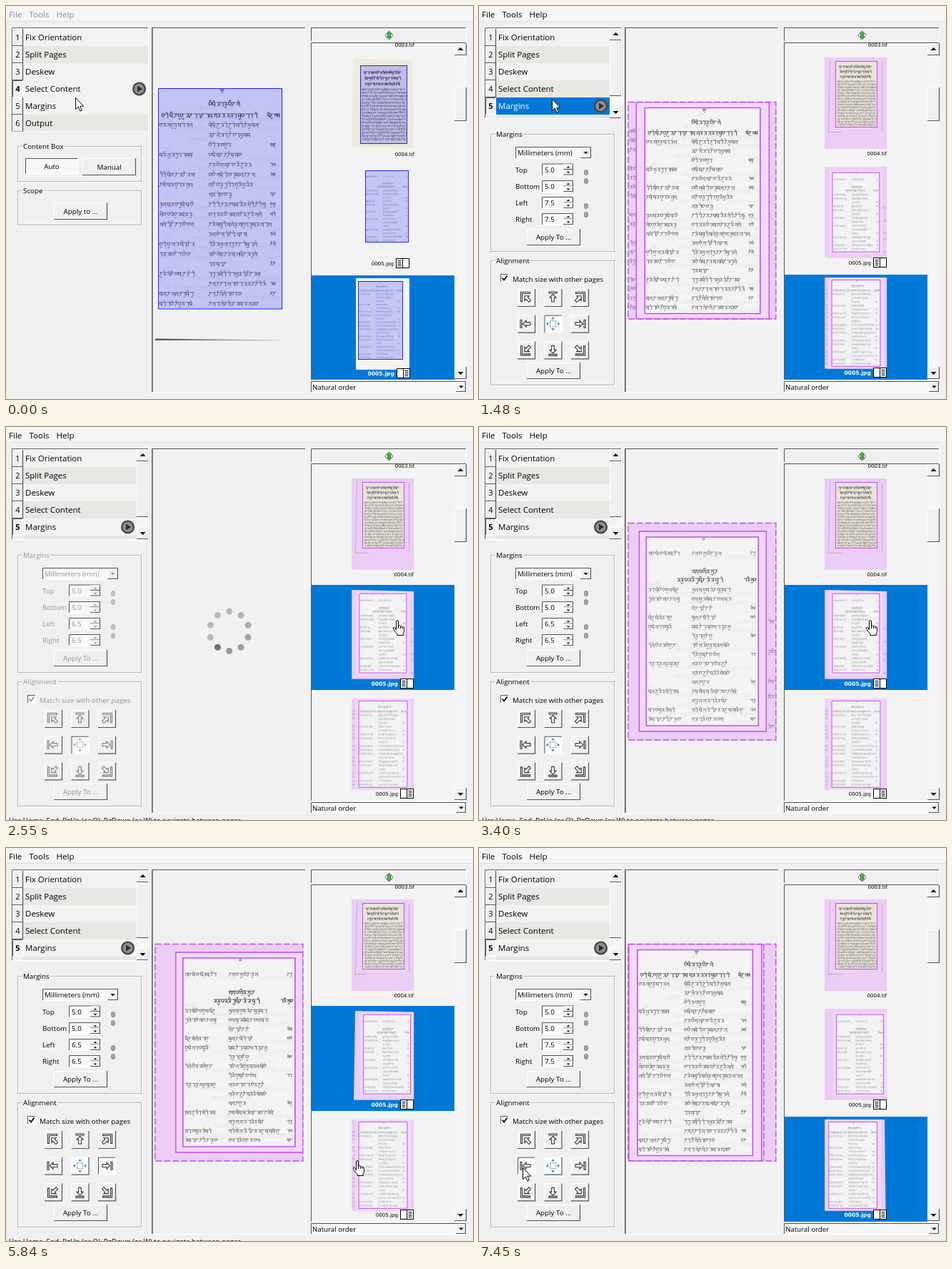
An HTML page that plays this animation: 654 by 550 pixels, repeating every 8000 ms.

```html
<!DOCTYPE html>
<html lang="en">
<head>
<meta charset="utf-8">
<title>Margins walkthrough</title>
<style>
html, body { margin: 0; width: 100%; height: 100%; overflow: hidden; background: #f0f0f0; }
svg { display: block; width: 654px; height: 550px; font-family: "Open Sans", "Noto Sans", sans-serif; }
text { fill: currentColor; white-space: pre; }
.tag { font-family: "DejaVu Sans", sans-serif; }
.off { color: #969696; }
.off .icon { opacity: .6; }
.title { paint-order: stroke; stroke: #f0f0f0; stroke-width: 5; }
.ink { fill: none; stroke: #4a4a4e; }
</style>
</head>
<body>
<svg id="stage" viewBox="0 0 654 550" color="#000"></svg>
<script>
const LOOP = 8000;
const BLUE = '#0078d7';
const $ = id => document.getElementById(id);

// ---------- drawing helpers ----------
const rect = (x, y, w, h, fill, more = '') =>
  `<rect x="${x}" y="${y}" width="${w}" height="${h}" fill="${fill}" ${more}/>`;
const path = (d, stroke, more = '') => `<path d="${d}" fill="none" stroke="${stroke}" ${more}/>`;
const text = (x, y, s, size = 9.8, more = '') =>
  `<text x="${x}" y="${y}" font-size="${size}" ${more}>${s}</text>`;
const group = (id, body, more = '') => `<g id="${id}" ${more}>${body}</g>`;
const at = (x, y, body, k = 1) => `<g transform="translate(${x} ${y}) scale(${k})">${body}</g>`;

function bevel(x, y, w, h, down, fill = '#f0f0f0') {
  const light = down ? '#555' : '#fff', dark = down ? '#fff' : '#555';
  return rect(x, y, w, h, fill) +
    path(`M${x + .5} ${y + h}V${y + .5}H${x + w}`, light) +
    path(`M${x} ${y + h - .5}H${x + w - .5}V${y}`, dark, down ? '' : 'stroke-width="1.2"');
}
const button = (x, y, w, h, s, down) =>
  bevel(x, y, w, h, down, down ? '#f7f7f7' : '#f0f0f0') +
  text(x + w / 2, y + h / 2 + 3.5, s, 9.8, 'text-anchor="middle"');
const frame = (y, h, s) =>
  rect(17.5, y + .5, 173, h, 'none', 'stroke="#fff"') +
  rect(16.5, y - .5, 173, h, 'none', 'stroke="#b4b4b4"') +
  text(24, y + 3, s, 9.8, 'class="title"');
const tri = (x, y, r, up) =>
  `<path d="M${x - r} ${y}h${2 * r}l${-r} ${up ? -r : r}z" fill="currentColor"/>`;

// ---------- script-like handwriting ----------
let seed = 7;
const rnd = () => (seed = (seed * 16807) % 2147483647) / 2147483647;
const LETTERS = ['h4m-.4 0v5.4', 'h4m-3.6 0q-1 4 1.6 3.6q2.2-.6 1.8-3.6', 'h4m-2 0v2.6q-2.2.8-2 2.6',
  'm0 .6q1.6-1 2 .8q0 2-2 2.2m2-3.4h2v5.2', 'h3.6q-.5 3-3 4.4m3-2.4v2.6', 'h4m-3.6 0v3h3m0-3v5.4'];
const MARKS = ['m.5-1.4q1.5-2.2 3 0', 'm1-2.6l2.2 1.4', 'm.8 6.2q1.6 2 2.8-.4'];

// A run of syllables of width w whose head line is at y.
function run(x, y, w, k = 1) {
  const d = [], n = v => v.toFixed(1);
  for (let p = x, left = 2; p < x + w - 3 * k; p += 4.6 * k) {
    const shape = s => s.replace(/-?\d*\.?\d+/g, v => n(v * k) + ' ');
    d.push(`M${n(p)} ${n(y)}` + shape(LETTERS[rnd() * 6 | 0]));
    if (rnd() < .45) d.push(`M${n(p)} ${n(y)}` + shape(MARKS[rnd() * 3 | 0]));
    if (--left <= 0) {
      p += 1.6 * k;
      d.push(`M${n(p + 3 * k)} ${n(y)}h${n(.9 * k)}`);
      left = 1 + (rnd() * 3 | 0);
    }
  }
  return d.join('');
}

// Rows: "left mid", a trailing n adds the page number.
function rows(spec, y, step, cols, k) {
  return spec.split('|').map((row, i) => {
    const [l, m] = row.split(' ').map(parseFloat), top = y + i * step;
    return (l ? run(cols[0], top, l, k) : '') + run(cols[1], top, m, k) +
      (row.endsWith('n') ? run(cols[2], top, 9, .8 * k) : '');
  }).join('');
}
const strong = (d, w) => `<path d="${d}" stroke-width="${w}"/>`;

const page7 = strong(run(86, 2, 8, .7) + rows('47 71|0 57|0 31n|50 46|0 61n|51 67n|47 66|0 32n|50 79n|47 78n|49 88|0 56n|51 71n|47 71|0 28n|49 71|0 82n|48 48n|48 71',
  49.5, 13.9, [2, 71, 157], 1), .75) +
  strong(run(71, 20, 43, 1.05) + run(5, 36, 136, 1.05) + run(153, 36, 20, .9), 1.05);
const page6 = strong(run(79, 2, 5, .7) + rows('43 42n', 21, 0, [3, 64, 146], .92) +
  rows('44 57|43 57|0 29n|35 34n|34 53|0 28n|41 54|0 40n|43 52|0 52|0 26n|44 66|0 52n|40 70n|46 47n',
    72, 12.93, [3, 64, 146], .92), .7) +
  strong(run(64, 46, 38, 1) + run(43, 58, 66, 1) + run(137, 58, 20, .85), 1.05);
const leafRows = () => {
  let d = '';
  for (let i = 0; i < 16; i++) d += run(4, 62 + i * 9.3, 126, 1);
  return strong(d, .9) + strong(run(8, 14, 112, 1.3) + run(12, 30, 105, 1.3) + run(14, 46, 100, 1.3), 1.9);
};
const bleed = (x, w, y, step, n) => {
  let d = '';
  for (let i = 0; i < n; i++) if (rnd() < .6) d += run(x, y + i * step, w, .9);
  return strong(d, .7);
};

// ---------- page scenes in a 207 x 304 area ----------
const PAGES = {
  7: { x: 23.5, y: 8, w: 161.5, h: 288, hx: 11.5, hy: 0, hw: 186, hh: 303.5, k: .926 },
  6: { x: 25.5, y: 19.5, w: 157, h: 264, hx: 15.5, hy: 11.5, hw: 178, hh: 280, k: 1 }
};
const line = 'stroke="#be50f0" vector-effect="non-scaling-stroke"';
function scene(n, dx, small) {
  const p = PAGES[n];
  const paper = rect(p.hx, p.hy, p.hw, p.hh, '#f1d7fb') + rect(p.x, p.y, p.w, p.h, '#f3f2f4') +
    `<g class="ink words" opacity="${small ? .65 : 1}"><use href="#page${n}" transform="translate(${p.x} ${p.y}) scale(${p.k})"/>` +
    `<use href="#page${n}" transform="translate(${p.x + p.w} ${p.y + 6}) scale(${-p.k} ${p.k})" opacity=".07"/>` +
    `<use href="#bleed${n}" opacity=".7"/></g>` +
    (small ? '' : rect(p.hx, p.hy, p.hw, p.hh, 'none', line + ' stroke-width="1.4"')) +
    rect(p.x, p.y, p.w, p.h, 'none', line + ` stroke-width="${small ? 1 : 1.6}"`);
  const dash = line + ' stroke-width="1.4" stroke-dasharray="9 3"';
  return rect(0, 0, 207, 304, '#ebcdf5') +
    `<g clip-path="url(#area)"><g transform="translate(${dx} 0)">${paper}</g></g>` +
    (small ? '' : rect(0, 0, 207, 303.5, 'none', dash) +
      (dx < 0 ? path('M190 0V303', '#be50f0', dash) : ''));
}

// ---------- static chrome ----------
const scroller = (x, y0, y1, t0, t1) =>
  rect(x, y0, 17, y1 - y0, '#f5f5f5') + bevel(x, y0, 17, 17) + tri(x + 8.5, y0 + 10, 4, true) +
  bevel(x, y1 - 17, 17, 17) + tri(x + 8.5, y1 - 10, 4) + bevel(x, t0, 17, t1 - t0);

const NAMES = ['Fix Orientation', 'Split Pages', 'Deskew', 'Select Content', 'Margins', 'Output'];
function list(count, active, width) {
  let s = '';
  for (let i = 0; i < count; i++) {
    const y = 32 + i * 24, on = i === active;
    s += rect(24, y, width - 24, 24, i % 2 && !on ? '#e8e7e4' : '#f2f2f2');
    if (on && count < 6) s += group('hot', rect(24, y, width - 24, 24, BLUE));
    s += bevel(9, y, 15, 24, on) + text(16.5, y + 16, i + 1, 11, `text-anchor="middle" ${on ? 'font-weight="700"' : ''}`) +
      text(27, y + 16, NAMES[i], 11.5, on ? 'id="name' + count + '"' : '');
    if (on) s += at(width - 12.5, y + 12, '<circle r="9.5" fill="#444"/><circle r="7.2" fill="#8f8f8f"/><path d="M-2.5-4.5L4.5 0L-2.500 4.500z" fill="#2c2c2c"/>');
  }
  return s;
}

const spinBox = (s, y, id) => text(51, y + 4, s) + bevel(88, y - 8, 45, 17, true, '#f8f8f8') +
  text(92, y + 4, '5.0', 9.8, id ? 'class="side"' : '') + bevel(118, y - 7, 14, 7.5) + bevel(118, y + .5, 14, 7.5) +
  tri(125, y - 2, 2.2, true) + tri(125, y + 3.5, 2.2);
const chain = y => at(150, y, '<g class="icon" fill="none" stroke="#444"><rect x="-2" y="-3.5" width="4" height="6" rx="1"/><path d="M0-2v3"/><rect x="-2" y="8.5" width="4" height="6" rx="1"/><path d="M0 10v3"/></g>');

const ARROW = '<path d="M-4.5 0l4.5-4.5v2.7h6v3.6h-6v2.7z"/>';
const EDGE = '<path d="M-8-5.5h2v11h-2z"/>' + ARROW;
const CORNER = '<path d="M-7.5-7.5h13v2h-11v11h-2z"/><g transform="translate(1 1) rotate(45)">' + ARROW + '</g>';
const MIDDLE = '<rect x="-4" y="-4" width="8" height="8" stroke="#4d7fa8" stroke-dasharray="1.5 1"/>' +
  [0, 90, 180, 270].map(a => `<path d="M-9.5 0l3-2.5v5z" fill="#3f86c6" stroke="none" transform="rotate(${a})"/>`).join('');
const ICONS = [[CORNER, 0], [EDGE, 90], [CORNER, 90], [EDGE, 0], [MIDDLE, 0], [EDGE, 180], [CORNER, 270], [EDGE, 270], [CORNER, 180]];
const alignPad = ICONS.map(([shape, turn], i) => {
  const x = 54 + (i % 3) * 37.5, y = 396 + (i / 3 | 0) * 36.7;
  return group('up' + i, bevel(x, y, 25, 25)) + group('down' + i, bevel(x, y, 25, 25, true, '#f9f9f9')) +
    group('over' + i, bevel(x, y, 25, 25, false, '#fbfbfb')) +
    `<g class="icon" transform="translate(${x + 12} ${y + 12}) rotate(${turn})" fill="#fff" stroke="#333" stroke-width="1.1">${shape}</g>`;
}).join('');

const startPanel = list(6, 3, 199) + path('M8.5 176V30.5H199', '#666') + path('M8 176H199.5V30', '#fff') +
  frame(197, 49, 'Content Box') + button(27, 213, 74, 23, 'Auto', true) + button(107, 213, 75, 24, 'Manual') +
  frame(259, 48, 'Scope') + button(67, 275, 75, 24, 'Apply to ...');

const marginsPanel = list(5, 4, 183) + rect(24, 152, 159, 5, '#e6e5e2') + rect(9, 152, 15, 5, '#f0f0f0') +
  scroller(183, 31, 157, 48, 126) + path('M8.5 158V30.5H199', '#666') + path('M8 157.5H199.5V30', '#fff') +
  group('fields',
    frame(180, 164, 'Margins') + bevel(51, 197, 107, 17, true, '#f8f8f8') + text(54, 209, 'Millimeters (mm)', 9.7) +
    bevel(142, 198, 15, 15) + tri(149.5, 204, 3.2) +
    spinBox('Top', 228.5) + spinBox('Bottom', 252) + spinBox('Left', 275, 1) + spinBox('Right', 298, 1) +
    chain(233.5) + chain(280.5) + button(67, 312, 75, 23, 'Apply To ...') +
    frame(357, 174, 'Alignment') + bevel(30, 375, 12, 12, true, '#fff') +
    path('M32.5 380.5l2.5 3l4.5-6', 'currentColor', 'stroke-width="1.8"') +
    text(47, 386, 'Match size with other pages') + alignPad + button(67, 499, 75, 23, 'Apply To ...'));

const blueBox = (x, y, w, h) => rect(x, y, w, h, '#0000ff', `fill-opacity=".19" stroke="#2626f0"`);
const sheetIcon = (x, y, right) => {
  let s = rect(x + .5, y + .5, 18, 13, '#fff', 'stroke="#000"') + path(`M${x + 9.5} ${y}v14`, '#000');
  for (let i = 0; i < 4; i++) s += path(`M${x + (right ? 11.5 : 2.5)} ${y + 3.5 + i * 2.4}h5`, '#000');
  return s;
};
const plainTag = (x, y, s) => text(x, y, s, 7.1, 'class="tag" text-anchor="end"');
const boldTag = (x, y, s) => text(x, y, s, 7.6, 'class="tag" text-anchor="end" font-weight="700" style="fill:#fff"');
const tag = (id, x, y, s) => group(id + 'off', plainTag(x, y, s)) + group(id + 'on', boldTag(x, y, s));

const startThumbs = rect(427, 377, 201, 146, BLUE) +
  '<path d="M486 74L569 76L571 199L484 197z" fill="#efe9de"/>' +
  at(496, 83, `<g class="ink">${at(0, 2, '<use href="#leaf"/>', .5)}</g>`) + blueBox(496.5, 83.5, 65, 109) +
  rect(503, 230, 61, 122, '#f2f2f3') +
  at(503, 230, '<g class="ink" opacity=".65"><use href="#page6"/></g>', .385) + blueBox(503.5, 230.5, 60, 100) +
  rect(490, 381, 75, 128, '#f3f3f4') +
  at(493, 385, '<g class="ink" opacity=".65"><use href="#page7"/></g>', .355) + blueBox(493.5, 385.5, 62, 109) +
  plainTag(572, 210, '0004.tif') + plainTag(543, 362.5, '0005.jpg') + sheetIcon(546, 353) +
  boldTag(544, 517, '0005.jpg') + sheetIcon(547, 507, true);

const thumb = (id, n, dx, y) => group(id, at(484.2, y, scene(n, dx, true), .42));
const gap = (id, d) => group(id, `<path d="${d}" fill="${BLUE}"/>`);
const marginThumbs =
  group('sel2', rect(427, 221, 201, 147, BLUE)) + group('sel3', rect(427, 376, 201, 147, BLUE)) +
  rect(484, 72, 87, 128, '#ebcdf5') + path('M491.5 76L489.5 176M564.5 78V174M488 176.5H508', '#9c8aa3', 'stroke-width=".7" opacity=".7"') +
  rect(499.5, 77.5, 58, 92, '#e9e3da') + at(500, 78, '<g class="ink" opacity=".85"><use href="#leaf"/></g>', .435) +
  rect(499.5, 77.5, 58, 92, 'none', 'stroke="#be50f0"') + plainTag(571, 208.5, '0004.tif') +
  thumb('t6c', 6, 0, 225) + thumb('t6r', 6, 13.5, 225) + thumb('t7c', 7, 0, 380) + thumb('t7l', 7, -10.5, 380) +
  gap('skewC', 'M484 225H572V230L484 228z') +
  gap('skewR', 'M484 225H572V229.5L489 228L487 353.5H484z') +
  gap('skewL', 'M568 379.5H572V508.5H569.5z') +
  tag('tag2', 549, 361.5, '0005.jpg') + sheetIcon(552, 352) + tag('tag3', 549, 516, '0005.jpg') + sheetIcon(552, 506, true);

const dots = [...Array(10).keys()].map(i => {
  const a = i * Math.PI / 5;
  return `<circle id="dot${i}" cx="${312.7 + 27.7 * Math.sin(a)}" cy="${285.8 - 27.7 * Math.cos(a)}" r="4.5"/>`;
}).join('');

const view = (id, n, dx) => group(id, at(208.8, 134.5, scene(n, dx)));
$('stage').innerHTML = `<defs>
  <clipPath id="area"><rect width="207" height="304"/></clipPath>
  <clipPath id="strip"><rect x="428" y="52" width="200" height="471"/></clipPath>
  <linearGradient id="edge"><stop stop-color="#55554f"/><stop offset="1" stop-color="#c4c4c0"/></linearGradient>
  <g id="page7">${page7}</g><g id="page6">${page6}</g><g id="leaf">${leafRows()}</g>
  <g id="bleed7">${bleed(2, 7, 26, 13, 21)}</g><g id="bleed6">${bleed(196, 16, 52, 21, 12)}</g>
  </defs>` +
  rect(0, 0, 654, 550, '#f0f0f0') + rect(0, 0, 654, 21, '#f5f5f5') + path('M0 21.5H654', '#dedede') +
  group('menu', text(4, 15.5, 'File', 11.6) + text(32.5, 15.5, 'Tools', 11.6) + text(70.5, 15.5, 'Help', 11.6)) +
  group('startPanel', startPanel) + group('marginsPanel', marginsPanel) +
  bevel(204, 30, 216, 511, true, '#f1f1f1') + path('M205.5 31V540', '#999') +
  group('startView',
    '<path d="M209 465.6L383 467.4v.8L209 468z" fill="url(#edge)"/>' +
    at(213, 115, '<g class="ink"><use href="#page7"/><use href="#page7" transform="translate(174 6) scale(-1 1)" opacity=".09"/></g>') +
    blueBox(213.5, 115.5, 173, 308.5)) +
  view('v7c', 7, 0) + view('v7l', 7, -10.5) + view('v6c', 6, 0) + view('v6r', 6, 13.5) + group('spinner', dots) +
  bevel(427, 30, 218, 20, true) +
  '<path d="M536.5 35l4 4h-2v4h2l-4 4l-4-4h2v-4h-2z" fill="#4fae4a" stroke="#2b6e2b" stroke-width=".8"/><path d="M531.5 39.5v3M541.5 39.5v3" stroke="#777"/>' +
  bevel(427, 51, 218, 473, true, '#f3f3f3') +
  `<g clip-path="url(#strip)">${plainTag(572, 56.5, '0003.tif')}${group('startThumbs', startThumbs)}${group('marginThumbs', marginThumbs)}</g>` +
  scroller(628, 52, 522, 114, 161) +
  bevel(427, 525, 218, 16, true, '#f6f6f6') + text(429, 537, 'Natural order', 9.7) + bevel(630, 526, 14, 14) + tri(637.5, 531.5, 3.2) +
  text(4, 553.5, '', 9.8, 'id="hint"') +
  group('arrow', '<path d="M.5.5v16l3.7-3.5l2.7 6l2.4-1l-2.6-5.8h5z" fill="#fff" stroke="#000"/>') +
  group('hand', '<path d="M5.5 14V2.2q0-1.7 1.5-1.7t1.5 1.7V8q2.4-.8 3 .8q2-.6 2.6 1q2.4-.2 2.4 2v3.6q0 2.4-1.4 4v2.1H7v-2q-2.4-2-5.6-7.3q-.6-1.8.8-2.2q1.4-.2 3.3 4z" fill="#fff" stroke="#000"/><path d="M8.5 8v4M11.5 9v3M14.1 10v2" stroke="#000"/>');

// ---------- timeline ----------
const SPIN = [[530, 7], [680, 2], [930, 3], [1050, 4], [1330, 5], [2550, 6], [2700, 7], [2820, 8],
  [3130, 9], [3250, 0], [5960, 0], [6090, 1], [6230, 2], [6480, 3], [6600, 4]];
const POINTER = [[0, 97, 128], [530, 102, 130], [1600, 330, 236], [1750, 490, 255], [1880, 529, 263], [2020, 538, 268],
  [2150, 541, 270], [3950, 330, 330], [4070, 93, 400], [4230, 104, 426], [4370, 126, 433], [4500, 141, 437],
  [5290, 250, 440], [5415, 380, 441], [5540, 470, 443], [5690, 477, 447], [5840, 485, 437], [6230, 400, 446],
  [6360, 290, 455], [6480, 160, 460], [6600, 71, 463], [6750, 66, 452], [6890, 63, 451], [7040, 62, 449], [7170, 61, 447]];
const NAV = 'Use Home, End, PgUp (or Q), PgDown (or W) to navigate between pages.';
const DRAG = 'Resize margins by dragging any of the solid lines.';
const latest = (steps, t) => steps.filter(s => s[0] <= t).pop();
const within = (t, ...spans) => spans.some(([a, b]) => t >= a && t < b);
const show = (id, on) => { $(id).style.display = on ? '' : 'none'; };

function draw(t) {
  const begun = t >= 530;
  const busy = within(t, [530, 1480], [2550, 3400], [5960, 6750]);
  const second = within(t, [2550, 5960]);
  const shifted = t >= 5020, lefted = t >= 7320;

  $('menu').style.color = begun ? '#000' : '#8c8c8c';
  for (const part of ['Panel', 'Thumbs']) {
    show('start' + part, !begun);
    show((part === 'Panel' ? 'margins' : 'margin') + part, begun);
  }
  show('startView', !begun);

  const hot = within(t, [530, 1600]);
  show('hot', hot);
  $('name5').style.fill = hot ? '#fff' : '';
  $('fields').setAttribute('class', busy ? 'off' : '');
  document.querySelectorAll('.side').forEach(e => { e.textContent = second ? '6.5' : '7.5'; });

  const checked = lefted ? 3 : second && shifted ? 5 : 4;
  const over = within(t, [4500, 5020]) ? 5 : within(t, [7040, 7320]) ? 3 : checked !== 4 ? 4 : -1;
  for (let i = 0; i < 9; i++) {
    show('down' + i, i === checked);
    show('over' + i, i === over && i !== checked);
    show('up' + i, i !== over && i !== checked);
  }

  const ready = begun && !busy;
  show('v7c', ready && !second && !lefted);
  show('v7l', ready && lefted);
  show('v6c', ready && second && !shifted);
  show('v6r', ready && second && shifted);
  const soft = within(t, [3400, 3550], [5020, 5140], [6750, 6890]);
  for (const id of ['v7c', 'v6c', 'v6r']) $(id).querySelector('.words').setAttribute('opacity', soft ? .85 : 1);

  show('t6c', !shifted);
  show('t6r', shifted);
  show('t7c', !lefted);
  show('t7l', lefted);
  show('skewC', second && !shifted);
  show('skewR', second && shifted);
  show('skewL', lefted);
  for (const [n, on] of [[2, second], [3, !second]]) {
    show('sel' + n, on);
    show(`tag${n}on`, on);
    show(`tag${n}off`, !on);
  }

  show('spinner', busy);
  if (busy) {
    const head = latest(SPIN, t)[1];
    for (let i = 0; i < 10; i++) {
      const age = (head - i + 10) % 10;
      const g = age ? Math.min(184, 144 + age * 7) : 114;
      $('dot' + i).setAttribute('fill', `rgb(${g},${g},${g})`);
    }
  }

  const nav = within(t, [1750, 3950], [5540, 6230]);
  const drag = within(t, [1600, 1750], [3950, 4070], [5290, 5540]);
  $('hint').textContent = nav ? NAV : drag ? DRAG : '';
  const [, x, y] = latest(POINTER, t);
  show('hand', nav);
  show('arrow', !nav);
  $(nav ? 'hand' : 'arrow').setAttribute('transform', `translate(${x} ${y})`);
}

const tick = () => {
  draw(performance.now() % LOOP);
  requestAnimationFrame(tick);
};
tick();
</script>
</body>
</html>
```
